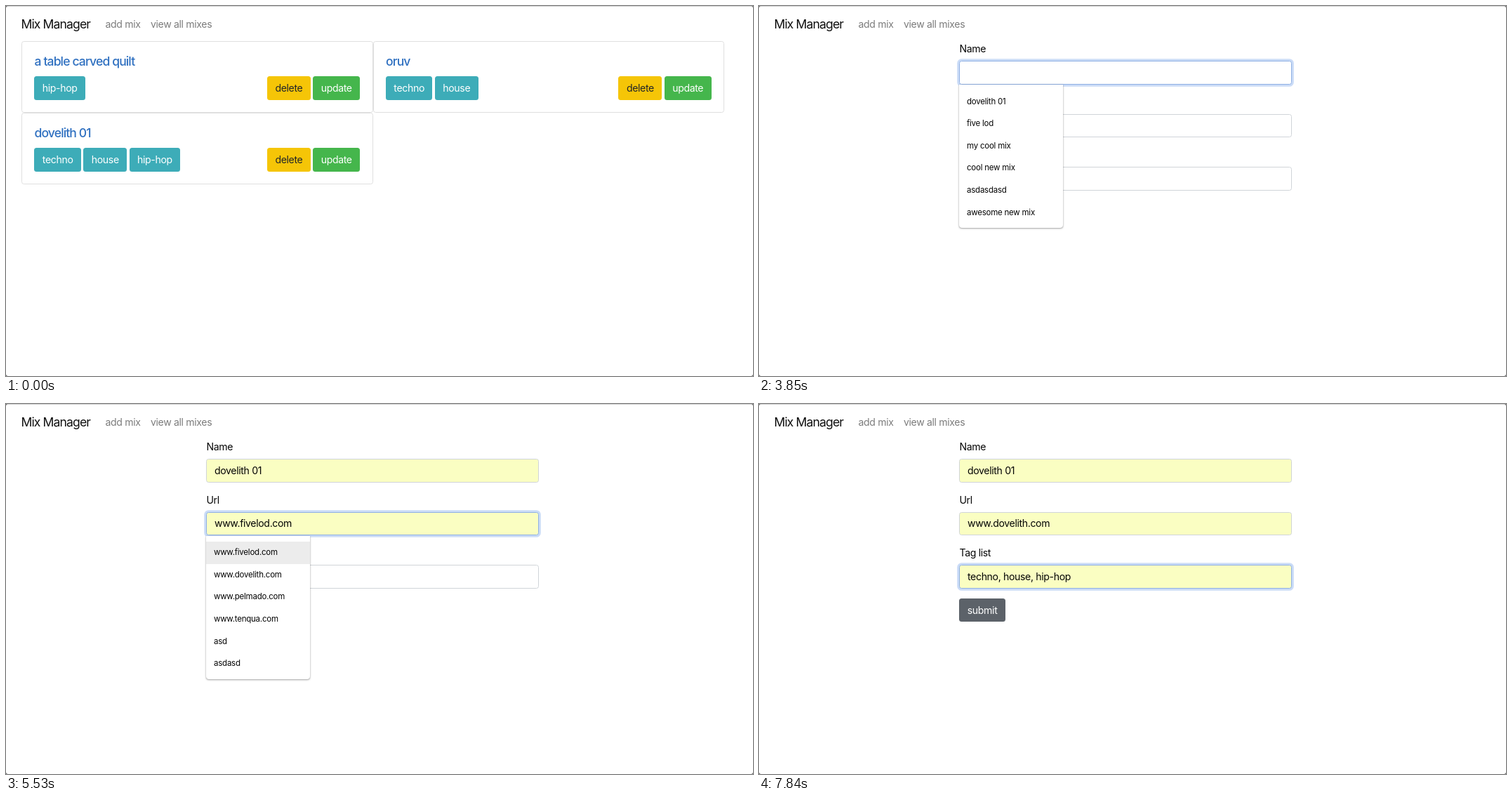
Recreate the animation shown at these times as an HTML page. Size 1064 by 527 pixels, loop 8000 ms.

```html
<!DOCTYPE html>
<html lang="en">
<head>
<meta charset="utf-8">
<title>Mix Manager</title>
<style>
  * { box-sizing: border-box; }
  html, body { margin: 0; width: 100%; height: 100%; overflow: hidden; background: #555; }
  body { font: 14.08px/20px Inter, "Open Sans", sans-serif; letter-spacing: -.025em; color: #050505; white-space: pre; }
  #stage { position: absolute; left: 0; top: 0; width: 1064px; height: 527px; background: #fff;
    border-top: 1px solid #d3d3d3; border-radius: 3px; }
  #stage div, #stage nav span { position: absolute; }
  #stage, #list, #form { overflow: hidden; }
  #list, #form { inset: -1px 0 0 0; }
  nav span { top: 15px; color: #7c7c7c; }
  nav .brand, .card h5 { font-size: 17.6px; letter-spacing: -.9px; }
  nav .brand { left: 21.5px; color: #111; }
  .card { width: 500.5px; height: 102px; border: 1px solid #dfdfdf; border-radius: 3.5px; }
  .card h5 { position: absolute; left: 17.5px; top: 18px; margin: 0; font-weight: 500; color: #2f70c0; }
  #stage .row { top: 49px; display: flex; gap: 3.5px; }
  .btn { height: 33.5px; padding: 0 11.4px; line-height: 33.5px; border-radius: 3.5px; color: #fff; }
  .tag { background: #3dacb8; }
  .del { background: #f5c507; color: #212529; }
  .upd { background: #45b64c; }
  .label { left: 285.5px; }
  .input { left: 285.4px; width: 474px; height: 33.4px; padding-left: 10.6px; border: 1px solid;
    border-color: color-mix(in srgb, #8fb0e4 calc(var(--f) * 100%), #d0d4d9); border-radius: 3.5px;
    box-shadow: 0 0 0 calc(2.8px * var(--f)) rgb(65 125 225 / calc(.27 * var(--f)));
    display: flex; align-items: center; }
  .caret { width: 1px; height: 16px; background: #333; }
  .popup { left: 285px; width: 148px; height: 204px; padding-top: 8.5px; background: #fff; z-index: 2;
    border-radius: 0 0 4px 4px; box-shadow: 0 0 1px rgba(0,0,0,.35), 0 1px 2.5px rgba(0,0,0,.35); }
  .popup p { margin: 0; height: 31.65px; padding-left: 11px; font-size: 11.5px; line-height: 31.65px; letter-spacing: -.02em; }
  #submit { left: 285.4px; top: 276.7px; }
</style>
</head>
<body>
<div id="stage">
  <nav><span class="brand">Mix Manager</span><span id="add" style="left:141.5px">add mix</span><span style="left:206px">view all mixes</span></nav>
  <div id="list"></div>
  <div id="form"><div id="submit" class="btn">submit</div></div>
</div>
<script>
const LOOP = 8000, PAGE_SWITCH = 2590;
const $ = id => document.getElementById(id);

const cards = [
  [22, 50, 'a table carved quilt', ['hip-hop']],
  [522.5, 50, 'oruv', ['techno', 'house']],
  [22, 152, 'dovelith 01', ['techno', 'house', 'hip-hop']]
];

// hover: [time, item index]; times in ms
const fields = [
  { label: 'Name', focus: 3295, hover: [[3990, 0]], pick: 4340, blur: 4640,
    items: ['dovelith 01', 'five lod', 'my cool mix', 'cool new mix', 'asdasdasd', 'awesome new mix'] },
  { label: 'Url', focus: 4640, hover: [[5530, 0], [5740, 1]], pick: 6060, blur: 6560,
    items: ['www.fivelod.com', 'www.dovelith.com', 'www.pelmado.com', 'www.tenqua.com', 'asd', 'asdasd'] },
  { label: 'Tag list', focus: 6560, hover: [[6930, 0]], pick: 7300, blur: LOOP + 500,
    items: ['techno, house, hip-hop', 'techno, house', 'hip-hop', 'techno', 'asd', 'asdasd'] }
];

const button = (kind, text) => `<span class="btn ${kind}">${text}</span>`;

$('list').innerHTML = cards.map(([x, y, title, tags]) =>
  `<div class="card" style="left:${x}px;top:${y}px"><h5>${title}</h5>` +
  `<div class="row" style="left:17.4px">${tags.map(tag => button('tag', tag)).join('')}</div>` +
  `<div class="row" style="right:17.4px">${button('del', 'delete')}${button('upd', 'update')}</div></div>`
).join('');

function addDiv(className, top, html = '') {
  const el = document.createElement('div');
  el.className = className;
  el.style.top = top + 'px';
  el.innerHTML = html;
  $('form').append(el);
  return el;
}

fields.forEach((field, i) => {
  const y = i * 75.6;
  addDiv('label', 51 + y, field.label);
  field.input = addDiv('input', 78.2 + y, '<span></span><i class="caret"></i>');
  [field.text, field.caret] = field.input.children;
  field.popup = addDiv('popup', 112 + y, field.items.map(item => `<p>${item}</p>`).join(''));
});

function ramp(t, start, length = 150) {
  const x = Math.min(1, Math.max(0, (t - start) / length));
  return x * x * (3 - 2 * x);
}

function drawField(field, t) {
  const { focus, hover, pick, blur, items, input, text, caret, popup } = field;
  const chosen = hover.filter(([time]) => t >= time).pop();
  const blinkOn = start => t >= start && t < start + 500 && t < blur;

  input.style.setProperty('--f', ramp(t, focus) - ramp(t, blur));
  input.style.background = chosen ? '#fafec2' : '#fff';
  text.textContent = chosen ? items[chosen[1]] : '';
  caret.style.opacity = (!chosen && blinkOn(focus)) || blinkOn(pick) ? 1 : 0;

  popup.style.opacity = t < focus + 40 ? 0 : 1 - ramp(t, pick, 120);
  [...popup.children].forEach((row, i) => {
    row.style.background = chosen && chosen[1] === i ? '#ececec' : '';
  });
}

function draw(now) {
  const t = now % LOOP;
  const onForm = t >= PAGE_SWITCH;
  $('list').style.display = onForm ? 'none' : '';
  $('form').style.display = onForm ? '' : 'none';
  $('add').style.color = t >= 2170 && t < 3010 ? '#404040' : '';
  const shade = ramp(t, 7450);
  $('submit').style.background = `rgb(${110 - 18 * shade} ${117 - 19 * shade} ${125 - 20 * shade})`;
  fields.forEach(field => drawField(field, t));
  requestAnimationFrame(() => draw(performance.now()));
}
draw(0);
</script>
</body>
</html>
```
